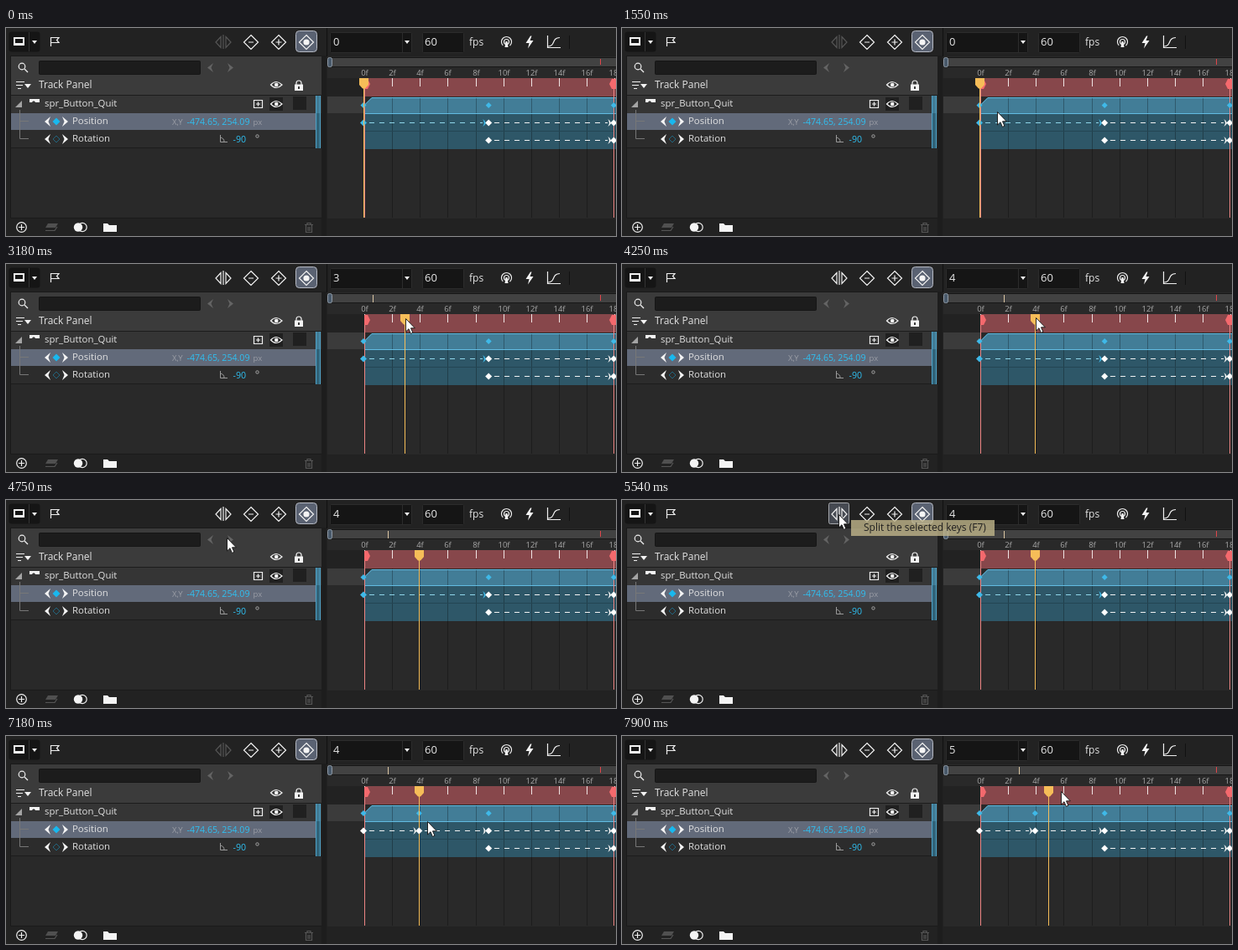
Recreate the animation shown at these times as an HTML page. Size 727 by 249 pixels, loop 7.99 s.

```html
<!DOCTYPE html>
<html lang="en">
<head>
<meta charset="utf-8">
<title>Split keys</title>
<style>
html, body { margin: 0; width: 100%; height: 100%; overflow: hidden; background: #222; }
svg { display: block; width: 727px; height: 249px; font-family: "Open Sans", "Noto Sans", sans-serif; }
text { fill: #e2e2e2; font-size: 12px; }
.row { font-size: 11.4px; }
.val { font-size: 10.6px; fill: #2fc0f2; }
.dim { font-size: 9.5px; fill: #9a9da5; }
.num { font-size: 13px; fill: #e6e6e6; }
.tick { font-size: 9.5px; fill: #a8a8a8; text-anchor: middle; }
.ln { fill: none; stroke: #f0f0f0; stroke-width: 1.2; }
.off { fill: none; stroke: #565656; stroke-width: 1.2; }
.w { fill: #f4f4f4; }
.box { fill: #151515; stroke: #2c2c2c; }
.px { shape-rendering: crispEdges; }
</style>
</head>
<body>
<svg viewBox="0 0 727 249">
  <rect width="727" height="249" fill="#222"/>

  <!-- left panel -->
  <rect x="5" y="33" width="371" height="194" fill="#292929"/>
  <rect x="5" y="34" width="371" height="46" fill="#3b3b3b"/>
  <rect x="5" y="80" width="371" height="22" fill="#353535"/>
  <rect x="5" y="102" width="364" height="20" fill="#626a7a"/>
  <rect x="5" y="122" width="371" height="21" fill="#2c2c2c"/>
  <path d="M5 80.5H376M5 143.5H376" stroke="#1c1c1c"/>
  <path d="M5.5 33V227.5H376M5 33.5H376" fill="none" stroke="#1a1a1a"/>
  <rect x="369" y="81" width="6" height="63" fill="#31647a"/>
  <rect x="369" y="81" width="6" height="21" fill="#427d97"/>
  <path d="M369.5 81V144M374.5 81V144" stroke="#4fa3c8"/>
  <rect x="376" y="33" width="6" height="216" fill="#1d1d1d"/>

  <!-- toolbar -->
  <path d="M382.5 0V34M671.5 9V25" stroke="#111"/>
  <rect x="3.5" y="4.5" width="37" height="24" rx="3" fill="#151515"/>
  <path d="M27.5 5V28" stroke="#333"/>
  <path d="M9 11H22V21H9ZM11 13V18H20V13Z" class="w" fill-rule="evenodd"/>
  <path d="M31 15H37L34 19Z" class="w"/>
  <path d="M53.5 22V11.5H63L60.5 14.5L63 17.5H53.5" class="ln"/>
  <rect id="hover" x="246.5" y="3.5" width="24" height="25" rx="2" fill="#464a52" stroke="#a6a8ac"/>
  <path id="split" d="M256 10.5L250 17L256 23.5ZM262 10.5L268 17L262 23.5ZM259 8V25" class="ln"/>
  <path d="M292 8.5L300.5 17L292 25.5L283.5 17ZM289 17H295M325 8.5L333.5 17L325 25.5L316.5 17ZM321.5 17H328.5M325 13.5V20.5" class="ln"/>
  <rect x="345.5" y="3.5" width="25" height="25" rx="4" fill="#5a6272" stroke="#b5b9c2"/>
  <path d="M358 8.5L366.5 17L358 25.5L349.5 17Z" class="ln"/>
  <circle cx="358" cy="17" r="3.6" class="w"/>
  <rect x="386.5" y="5.5" width="97" height="24" rx="1" class="box"/>
  <path d="M472.5 6V29" stroke="#2c2c2c"/>
  <path d="M475 15H481L478 19Z" class="w"/>
  <text id="frame" x="390" y="21" class="num">0</text>
  <rect x="496.5" y="5.5" width="49" height="24" rx="1" class="box"/>
  <text x="499" y="21" class="num">60</text>
  <text x="552" y="21">fps</text>
  <circle cx="596.5" cy="16.5" r="6" class="ln" stroke-dasharray="28 10" transform="rotate(135 596.5 16.5)"/>
  <circle cx="596.5" cy="16.5" r="3" class="ln"/>
  <path d="M595.5 16H597.5L598.5 23H594.5Z" class="w"/>
  <path d="M625 9.5L619.5 18H623.5L622 24.5L628.5 15H624.5L626.5 9.5Z" class="w"/>
  <path d="M645.5 9V23.5H661M646 22C655 22 650 11.5 660 11.5" class="ln"/>

  <!-- search and header -->
  <circle cx="19" cy="46" r="3.8" class="ln"/>
  <path d="M22 49L26 53" class="ln"/>
  <rect x="39.5" y="39.5" width="192" height="16" rx="1" fill="#1c1c1c" stroke="#151515"/>
  <path d="M247 42L240 47.5L247 53L244.5 47.5ZM264 42L271 47.5L264 53L266.5 47.5Z" fill="#646464"/>
  <path d="M12 64.5H22M12 68.5H20M14 72.5H18" class="ln"/>
  <path d="M22 67H30L26 72Z" class="w"/>
  <text x="39" y="72">Track Panel</text>
  <g id="eye">
    <path d="M315.5 68Q322 61 329 68Q322 75 315.5 68Z" class="ln"/>
    <circle cx="322.2" cy="68" r="2.3" class="w"/>
  </g>
  <path d="M346 68V66A3 3 0 0 1 352 66V68" class="ln"/>
  <path d="M344 67.5H354V75H344ZM348 70V73H350V70Z" class="w" fill-rule="evenodd"/>

  <!-- tracks -->
  <path d="M19 87V95H11Z" fill="#a4a4a4"/>
  <path d="M28 85H40V89H35L34 87.5H32L31 89H28Z" class="w"/>
  <text x="46" y="94" class="row">spr_Button_Quit</text>
  <path d="M295.5 86.5H305.5V95.5H295.5ZM298 91H303M300.5 88.5V93.5" class="ln"/>
  <rect x="314" y="83" width="16" height="16" fill="#202020"/>
  <use href="#eye" y="23"/>
  <rect x="342" y="82" width="16" height="16" fill="#202020"/>
  <path d="M16.5 98V132.5H27M16.5 111.5H27" fill="none" stroke="#777"/>
  <path id="step" d="M53 106L46 112L53 118L50.5 112ZM67 106L74 112L67 118L69.5 112Z" class="w"/>
  <use href="#step" y="21"/>
  <path d="M60 107.5L64.5 112L60 116.5L55.5 112Z" fill="#19b8ee"/>
  <path d="M60 129L64 133L60 137L56 133Z" fill="none" stroke="#22667f"/>
  <text x="79" y="115" class="row">Position</text>
  <text x="79" y="136" class="row">Rotation</text>
  <text x="198" y="116" class="dim">X,Y</text>
  <text x="215.5" y="116" class="val">-474.65, 254.09</text>
  <text x="294.5" y="116" class="dim">px</text>
  <path d="M255.5 128V136.5H264M255.5 131Q260 132 260 136" fill="none" stroke="#999"/>
  <text x="270.5" y="137" class="val">-90</text>
  <circle cx="299.5" cy="129.5" r="1.7" fill="none" stroke="#aaa"/>

  <!-- bottom bar -->
  <circle cx="18.5" cy="238.5" r="5.8" class="ln"/>
  <path d="M15 238.5H22M18.5 235V242" class="ln"/>
  <path d="M50 234H62L59 239H47Z" fill="#505050"/>
  <path d="M47 242.5H58L61 238" class="off"/>
  <circle cx="91" cy="238.5" r="5.2" class="ln"/>
  <circle cx="86" cy="238.5" r="5.2" class="w"/>
  <path d="M116 234H121L123 236H132V244H116Z" class="w"/>
  <path d="M356 235.5H366M359 235V233.5H363V235M357.5 236V244.5H364.5V236M360 238V243M362 238V243" class="off"/>

  <!-- timeline -->
  <rect x="383" y="34" width="344" height="194" fill="#292929"/>
  <rect x="386" y="36" width="341" height="10" fill="#424242"/>
  <path d="M386 35.5H727M386 46.5H727" stroke="#161616"/>
  <path id="mini" class="px" d="M0 37V46" stroke="#dcc7a4"/>
  <path d="M708.5 37V44" stroke="#e0474c"/>
  <rect x="383.5" y="35.5" width="5" height="11" rx="2" fill="#4a5a6b" stroke="#8f9aa6"/>
  <rect x="383" y="60" width="44" height="22" fill="#222"/>
  <rect x="383" y="82" width="44" height="20" fill="#3b3b3b"/>
  <rect x="427" y="60" width="300" height="22" fill="#87474b"/>
  <path d="M427 103V92L436 83H727V103Z" fill="#427d97"/>
  <rect x="427" y="103" width="300" height="42" fill="#2e5768"/>
  <g id="grid" class="px"></g>
  <path d="M427 123.5H727" stroke="#234553"/>
  <path d="M427.5 102.5V92L436 83.5H727M427 102.5H727" fill="none" stroke="#62bce2"/>
  <path class="px" d="M427.5 73V227M724.5 73V227" stroke="#ee8584"/>
  <path d="M427 61H431L434 67L431 73H427ZM727 61H722L719 67L722 73H727Z" fill="#f4696d"/>
  <g id="before"></g>
  <g id="after"></g>
  <g id="keys"></g>
  <g id="head">
    <path class="px" d="M.5 72V227" stroke="#f6bd58"/>
    <path d="M-5 60H6V68L2 72.5H-1L-5 68Z" fill="#f6bd58"/>
  </g>
  <g id="cut"></g>

  <g id="tip">
    <rect x="273" y="24" width="171" height="19" fill="#c0b58a"/>
    <text x="288" y="37" style="fill:#1e1e1e">Split the selected keys (F7)</text>
  </g>
  <path id="cursor" d="M.5 .5V16L4 12.7L6.4 18.4L8.9 17.3L6.5 11.8H11.3Z" fill="#fff" stroke="#111" stroke-width=".9"/>
</svg>
<script>
const LOOP = 7990, STEP = 90, PITCH = 16.575;
const BLUE = '#3fb9e8';
const CLIP_Y = 92.5, POS_Y = 113.5, ROT_Y = 134.5;
const APPEAR = 650, DRAG = 2640, DROP = 3600, HOVER = 4990, TIP = 5540, CLICK = 5900, LEAVE = 6520, REDRAG = 7630;

const $ = id => document.getElementById(id);
const xOf = f => 426 + PITCH * f;

const key = (x, y, fill = '#fff', r = 4) =>
  `<path d="M${x} ${y - r}l${r} ${r}l${-r} ${r}l${-r} ${-r}Z" fill="${fill}"/>`;

// dashed tween that ends in a chevron just before the next key
const span = (a, b, y, dash = '#f4f4f4', end = dash) =>
  `<path class="px" d="M${xOf(a) + 7} ${y}H${xOf(b) - 7}" stroke="${dash}" stroke-dasharray="6"/>` +
  `<path d="M${xOf(b) - 7} ${y - 4.5}q7 4.5 0 9q3 -4.5 0 -9Z" fill="${end}"/>`;

let grid = '';
for (let f = 0; f <= 18; f += 2) {
  const x = Math.round(xOf(f) + 1) + 0.5;
  grid += `<path d="M${x} 82V227" stroke="#000" opacity=".28"/>` +
    `<path d="M${x} 60V70" stroke="#f0e4e4"/>` +
    `<text x="${x}" y="57" class="tick">${f}f</text>`;
}
$('grid').innerHTML = grid;

$('before').innerHTML = span(0, 9, POS_Y, '#8fd6ea', BLUE) + key(xOf(0), POS_Y, BLUE);
$('after').innerHTML = span(0, 4, POS_Y) + span(4, 9, POS_Y) + key(xOf(0), POS_Y) + key(xOf(4), CLIP_Y, BLUE, 3.5);
$('cut').innerHTML = key(xOf(4), POS_Y);
$('keys').innerHTML = [0, 9, 18].map(f => key(xOf(f), CLIP_Y, BLUE, 3.5)).join('') +
  [POS_Y, ROT_Y].map(y => span(9, 18, y) + key(xOf(9), y) + key(xOf(18), y)).join('');

// hand movements: start, end and a Bezier curve of two or four points
const strokes = [
  [APPEAR, 1370, [710, 185], [595, 150], [480, 126], [459, 116]],
  [1370, 2180, [459, 116], [452, 92], [381, 66], [425, 64]],
  [DRAG, DROP, [425, 63], [470, 65], [483, 65], [493, 64]],
  [4210, HOVER, [493, 64], [350, 132], [213, 20], [258, 26]],
  [HOVER, 5170, [258, 26], [258, 17]],
  [LEAVE, 7540, [258, 17], [466, 155], [560, 100], [493, 65]],
  [REDRAG, 7900, [493, 65], [523, 66]]
];

const mix = (p, q, k) => p.map((v, i) => v + (q[i] - v) * k);

function bezier(points, k) {
  while (points.length > 1) points = points.slice(1).map((q, i) => mix(points[i], q, k));
  return points[0];
}

function pointer(t) {
  const [start, end, ...points] = strokes.filter(s => s[0] <= t).pop() || strokes[0];
  const held = Math.max(0, Math.floor((t - start) / STEP) * STEP);
  return bezier(points, t >= end ? 1 : held / (end - start)).map(Math.round);
}

// the playhead follows the dragged pointer one step late
function frameAt(t) {
  if (t < DRAG + STEP) return 0;
  const seen = t < REDRAG + STEP ? Math.min(t - STEP, DROP) : t - STEP;
  return Math.max(0, Math.round((pointer(seen)[0] - 424.5) / PITCH));
}

function tipAlpha(t) {
  if (t < TIP) return 0;
  return Math.max(0, Math.min(1, 0.8 + (t - TIP) / 900, (LEAVE + 225 - t) / 225));
}

const show = (id, on) => { $(id).style.display = on ? '' : 'none'; };
const move = (id, x, y = 0) => $(id).setAttribute('transform', `translate(${x} ${y})`);

function draw(t) {
  const f = frameAt(t), done = t >= CLICK;
  const onKey = f === 0 || (done && f === 4);
  $('frame').textContent = f;
  move('head', Math.floor(xOf(f)));
  move('mini', Math.round(384 + 17.8 * f) + 0.5);
  $('split').setAttribute('class', onKey ? 'off' : 'ln');
  show('hover', t >= HOVER && !done);
  show('before', !done);
  show('after', done);
  show('cut', done);
  $('tip').setAttribute('opacity', tipAlpha(t));
  show('cursor', t >= APPEAR);
  move('cursor', ...pointer(t));
}

const start = performance.now();
function loop() {
  draw((performance.now() - start) % LOOP);
  requestAnimationFrame(loop);
}
loop();
</script>
</body>
</html>
```
